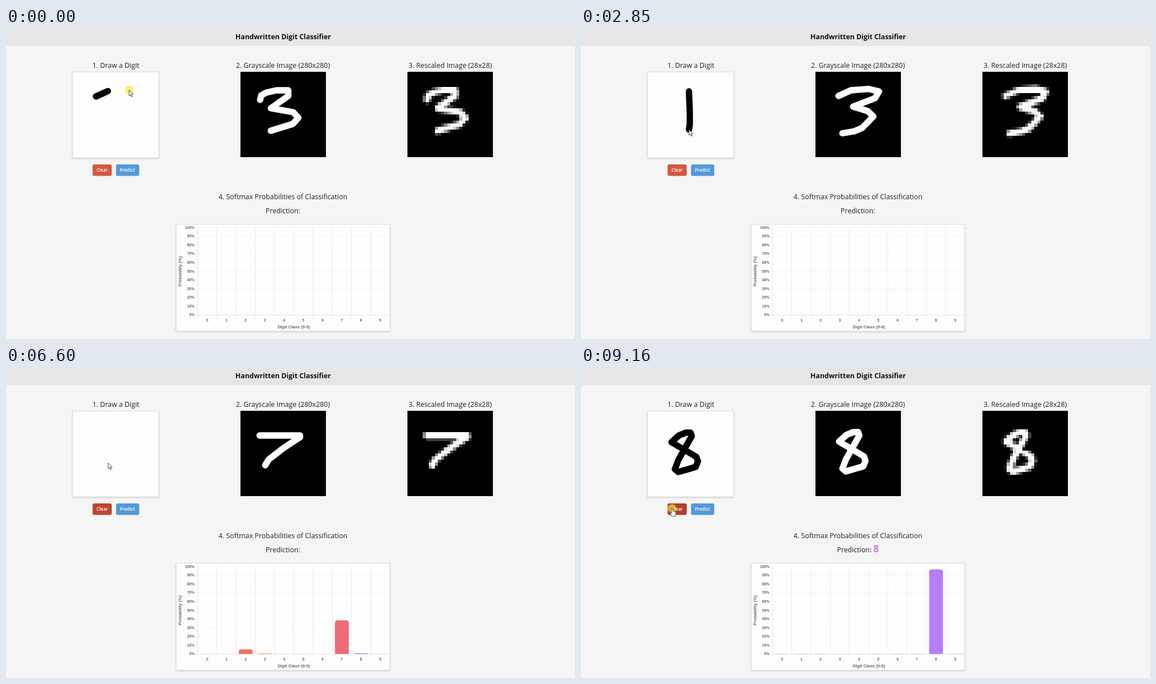
Recreate the animation shown at these times as an HTML page with a canvas. Size 1012 px wide and 554 px high, loop 9.23 s.

```html
<!DOCTYPE html>
<html lang="en">
<head>
<meta charset="utf-8">
<title>Handwritten Digit Classifier</title>
<style>
html, body { margin: 0; width: 100%; height: 100%; overflow: hidden; background: #f5f5f5; }
svg { position: absolute; left: 0; top: 0; display: block; }
#small { position: absolute; left: 714px; top: 78px; width: 152px; height: 152px; image-rendering: pixelated; }
text { font-family: "Open Sans", "Noto Sans", sans-serif; font-size: 12.35px; fill: #212121; text-anchor: middle; }
.title { font-size: 12.28px; font-weight: 700; fill: #111; }
.btn { font-size: 8px; font-weight: 600; fill: #fff; }
#digit { font-size: 17px; font-weight: 700; }
.tick, .axis { font-family: "Liberation Sans", Arial, sans-serif; font-weight: 700; fill: #666; }
.tick { font-size: 6.7px; }
.pct { text-anchor: end; }
.axis { font-size: 7.65px; }
.card { fill: #fefefe; stroke: #dcdcdc; stroke-width: .7; filter: drop-shadow(0 1.5px 1.5px rgba(0,0,0,.2)); }
.ink { fill: none; stroke-width: 11.3; stroke-linecap: round; stroke-linejoin: round; }
#arrow, #hand { fill: #fff; stroke: #222; stroke-width: .8; stroke-linejoin: round; }
</style>
</head>
<body>
<svg width="1012" height="554" viewBox="0 0 1012 554">
  <rect width="1012" height="32" fill="#e6e6e6"/>
  <text class="title" x="493" y="20.3">Handwritten Digit Classifier</text>
  <text x="195.5" y="70.7">1. Draw a Digit</text>
  <text x="492.5" y="70.7">2. Grayscale Image (280x280)</text>
  <text x="790" y="70.7">3. Rescaled Image (28x28)</text>
  <rect class="card" x="118.7" y="78.5" width="152.6" height="152.6"/>
  <polyline id="pad" class="ink" stroke="#000"/>
  <rect x="417" y="78" width="152" height="152"/>
  <polyline id="gray" class="ink" stroke="#fff" transform="translate(298 -1)"/>
  <rect id="clear" x="154" y="243" width="34" height="20.5" rx="3"/>
  <rect id="predict" x="195.7" y="243" width="41.3" height="20.5" rx="3"/>
  <text class="btn" x="171" y="256.2">Clear</text>
  <text class="btn" x="216" y="256.2">Predict</text>
  <text x="492.5" y="305">4. Softmax Probabilities of Classification</text>
  <text x="492.5" y="329.6">Prediction:<tspan id="digit" dx="3.3"></tspan></text>
  <rect class="card" x="303" y="350" width="379.6" height="190"/>
  <g id="chart"></g>
  <g id="bars"></g>
  <text class="axis" x="512" y="535">Digit Class (0-9)</text>
  <text class="axis" transform="translate(312 433.5) rotate(-90)">Probability (%)</text>
  <g id="cursor">
    <circle id="glow" r="7.6" fill="#fae628" fill-opacity=".67"/>
    <path id="arrow" d="M0 0V10L2.3 7.9 4 11.6 5.6 11 4 7.3H7.2Z"/>
    <path id="hand" d="M-1.2 0Q0-1.6 1.2 0V5Q2.2 4 3.2 5.2 4.3 4.6 5 5.7 6.6 5.3 6.8 7V10Q6.6 12 5.4 14H-.4Q-2 11-3.6 8.6-3.6 6.8-1.2 8.4Z"/>
  </g>
</svg>
<canvas id="small" width="28" height="28"></canvas>
<script>
const LOOP = 9230, LEAD = 100, BASE = 511.3, FULL = 155.6;
const PREDICT = [223, 251], CLEAR = [162, 252];
const COLORS = ['#5aa9f0', '#7a7bda', '#f07560', '#f9b075', '#7cc98f', '#56bfc0', '#4f9fe6', '#ee6a77', '#b57ffb', '#9a9aa8'];

const $ = id => document.getElementById(id);
const points = s => s.split(' ').map(p => p.split(',').map(Number));
const clamp = v => Math.min(1, Math.max(0, v));
const easeOut = (v, power) => 1 - (1 - clamp(v)) ** power;
const mix = (a, b, k) => a.map((v, i) => v + (b[i] - v) * k);

const FIRST = points('154,129 156,121 165,116 183,112 204,112 204,122 173,144 213,151 222,161 212,172 173,184');

// pen: stroke start and end; shown: result arrives; clear: pad and chart reset
const ROUNDS = [
  { digit: 3, pen: [-60, 560], shown: 1080, clear: 1930, probs: { 3: 95, 5: 3 },
    pts: points('160,122 182,112 213,109.5 232,114 225,126 186,141 212,149 222,158.5 202,179 188,185 167,188.5') },
  { digit: 1, pen: [2330, 2820], shown: 3260, clear: 4155, probs: { 1: 99 },
    pts: points('192,113 193.5,150 193.5,172 192,181') },
  { digit: 7, pen: [4530, 5270], shown: 5790, clear: 6428, probs: { 7: 84, 2: 11.5, 3: 1.7, 8: 1.7 },
    pts: points('153,123 225,123 225,126 196,145 169,166 163,176') },
  { digit: 8, pen: [7000, 8120], shown: 8480, clear: LOOP, probs: { 8: 98 },
    pts: points('195,117 186,117 174,122 161,134 205,160 208,168 204,178 173,187 167,182 173,166 197,123 195,117') }
];

// Each round: finish the stroke, visit Predict, visit Clear, go to the next start
const STOPS = [], CLICKS = [], HOVERS = { predict: [], clear: [] };
for (const { pts, pen, shown, clear } of ROUNDS) {
  const stop = (from, to, pos) => STOPS.push([from, pos], [to, pos]);
  STOPS.push([pen[0] - LEAD, pts[0]]);
  stop(pen[1] - LEAD, pen[1] + 40, pts.at(-1));
  stop(shown - 180, shown + 120, PREDICT);
  stop(clear - 150, clear, CLEAR);
  CLICKS.push([shown - 110, shown - 30], [clear - 100, clear]);
  HOVERS.predict.push([shown - 240, shown + 140]);
  HOVERS.clear.push([clear - 300, clear + 30]);
}

// Leading part of a polyline, up to fraction u of its length
function trim(pts, u) {
  const lens = pts.slice(1).map((p, i) => Math.hypot(p[0] - pts[i][0], p[1] - pts[i][1]));
  let left = clamp(u) * lens.reduce((a, b) => a + b);
  const out = [pts[0]];
  for (let i = 0; i < lens.length && left > 0; i++) {
    out.push(mix(pts[i], pts[i + 1], Math.min(1, left / lens[i])));
    left -= lens[i];
  }
  return out;
}

const stroke = ({ pts, pen: [a, b] }, t) => trim(pts, (t - a) / (b - a));

function buildChart() {
  let s = '';
  for (let i = 0; i <= 10; i++) {
    const y = BASE - FULL * i / 10, x = 340.6 + 34.2 * i;
    s += `<path d="M336.5 ${y}H682.3" stroke="${i ? '#f4f4f4' : '#dedede'}" stroke-width=".8"/>`;
    if (i < 10) {
      s += `<path d="M${x} 355.7V516" stroke="${i ? '#e8e8e8' : '#dadada'}" stroke-width=".8"/>` +
        `<text class="tick" x="${x + 17.2}" y="522.6">${i}</text>`;
    }
    s += `<text class="tick pct" x="335.3" y="${y + 2.1}">${i * 10}%</text>`;
  }
  $('chart').innerHTML = s;
  $('bars').innerHTML = COLORS.map(c => `<path fill="${c}"/>`).join('');
}

function barPath(i, h) {
  if (h < .05) return '';
  const x = 345.7 + 34.2 * i, w = 24.6, r = Math.min(4.5, h);
  return `M${x} ${BASE}v${r - h}q0 ${-r} ${r} ${-r}h${w - 2 * r}q${r} 0 ${r} ${r}v${h - r}z`;
}

let lastPts;
function showResult(pts) {
  if (pts === lastPts) return;
  lastPts = pts;
  $('gray').setAttribute('points', pts.join(' '));
  const c = $('small').getContext('2d'), k = 28 / 152;
  c.setTransform(1, 0, 0, 1, 0, 0);
  c.fillRect(0, 0, 28, 28);
  c.setTransform(k, 0, 0, k, -119 * k, -79 * k);
  c.strokeStyle = '#fff';
  c.lineWidth = 11.3;
  c.lineCap = c.lineJoin = 'round';
  c.beginPath();
  pts.forEach(p => c.lineTo(...p));
  c.stroke();
}

function drawCursor(t) {
  const drawing = ROUNDS.find(({ pen }) => t + LEAD >= pen[0] && t + LEAD < pen[1]);
  const i = STOPS.findIndex(s => s[0] > t), [a, from] = STOPS[i - 1], [b, to] = STOPS[i];
  const [x, y] = drawing ? stroke(drawing, t + LEAD).pop() : mix(from, to, easeOut((t - a) / (b - a), 2));
  const over = y > 243 && y < 264 && (x < 188 || x > 196);
  const show = (id, on) => $(id).setAttribute('visibility', on ? 'visible' : 'hidden');
  $('cursor').setAttribute('transform', `translate(${x} ${y})`);
  show('glow', drawing || CLICKS.some(([a, b]) => t >= a && t < b));
  show('hand', over);
  show('arrow', !over);
}

function tintButton(id, t, from, to) {
  const k = Math.max(...HOVERS[id].map(([a, b]) => Math.min(clamp((t - a) / 110), clamp(1 - (t - b) / 450))));
  $(id).setAttribute('fill', `rgb(${mix(from, to, k).map(Math.round)})`);
}

function render(t) {
  const drawn = ROUNDS.find(r => t >= r.pen[0] && t < r.clear);
  $('pad').setAttribute('points', drawn ? stroke(drawn, t).join(' ') : '');

  const done = ROUNDS.findLast(r => t >= r.shown);
  showResult(done ? done.pts : FIRST);

  const live = done && t < done.clear;
  $('digit').textContent = live ? done.digit : '';
  if (live) $('digit').style.fill = COLORS[done.digit];

  const level = done
    ? easeOut((Math.min(t, done.clear) - done.shown) / 1000, 4) * (1 - easeOut((t - done.clear) / 1000, 4))
    : 0;
  [...$('bars').children].forEach((bar, i) => {
    const p = done ? done.probs[i] || .2 : 0;
    bar.setAttribute('d', barPath(i, p / 100 * FULL * level));
  });

  tintButton('clear', t, [212, 88, 64], [178, 62, 44]);
  tintButton('predict', t, [83, 153, 217], [66, 128, 182]);
  drawCursor(t);
}

buildChart();
const start = performance.now();
function tick() {
  render(Math.max(0, performance.now() - start) % LOOP);
  requestAnimationFrame(tick);
}
tick();
</script>
</body>
</html>
```
